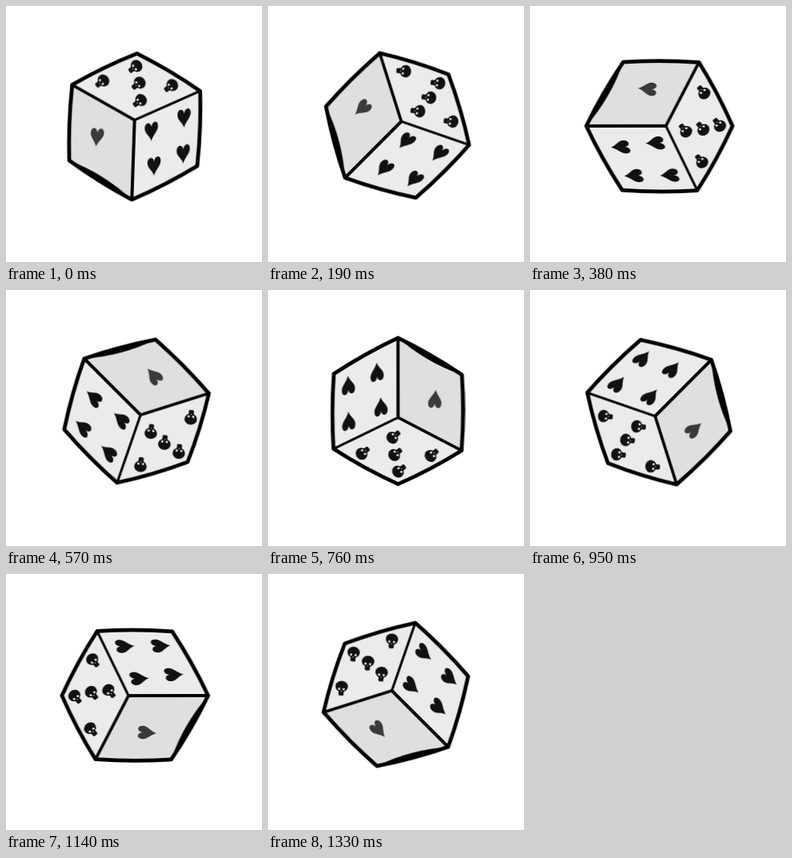
These frames come from a looping animation (320x320 px, 1520 ms). An HTML page:

```html
<!DOCTYPE html>
<html lang="en">
<head>
<meta charset="utf-8">
<title>Rolling die</title>
<style>
  html, body { margin: 0; width: 100%; height: 100%; overflow: hidden; background: #fff; }
  svg { display: block; width: 100%; height: 100%; }
  /* Rests with a slight tilt, then turns in hard eighths; the delay keeps samples off the step edges. */
  #die { transform-origin: 0 0; animation: roll 1520ms -1ms infinite; }
  @keyframes roll {
    0% { transform: rotate(2deg); animation-timing-function: step-end; }
    12.5% { transform: rotate(45deg); animation-timing-function: steps(7, end); }
    100% { transform: rotate(360deg); }
  }
  .line { fill: none; stroke: #000; stroke-linecap: round; stroke-linejoin: round; }
</style>
</head>
<body>
<svg viewBox="0 0 320 320">
  <defs>
    <path id="heart" d="M0 12C-2 5-8.3 1-8.3-5C-8.3-13-1-13 0-5.500C1-13 8.300-13 8.300-5C8.300 1 2 5 0 12Z"/>
    <use id="suit" href="#heart" transform="rotate(-2) skewY(-12)"/>
    <g id="skull" transform="rotate(51)">
      <ellipse cy="-2" rx="7.800" ry="7"/>
      <rect x="-3.200" y="1" width="6.400" height="8.500" rx="1.800"/>
      <g fill="#eee">
        <circle cx="-2.900" cy="1.200" r="1.400"/>
        <circle cx="2.900" cy="1.200" r="1.400"/>
        <circle cy="4" r=".6"/>
      </g>
    </g>
    <path id="outline" d="M-1-91.600Q40.900-72.400 79.600-47.600Q82.600-.7 79.200 46.200Q40.700 71.400-1 91.200Q-42.600 70.800-80.900 45Q-83.900-2.400-80.500-49.700Q-42.400-73.500-1-91.600Z"/>
  </defs>

  <g transform="translate(161.5 151)">
    <g id="die">
      <use href="#outline" fill="#ebebeb"/>
      <path fill="#dfdfdf" d="M-1.100-8.300L-80.500-49.700L-80.900 45L-1 91.200Z"/>

      <use href="#heart" x="0" y="0" fill="#3a3a3a" transform="translate(-47.3 14.5) rotate(4)"/>
      <g fill="#111">
        <use href="#suit" x="20.4" y="5"/>
        <use href="#suit" x="60.7" y="-13.1"/>
        <use href="#suit" x="25.3" y="48.2"/>
        <use href="#suit" x="61.2" y="31.7"/>

        <use href="#skull" x="-43.2" y="-55.2"/>
        <use href="#skull" x="-2.5" y="-74.8"/>
        <use href="#skull" x="2.3" y="-54.1"/>
        <use href="#skull" x="4.6" y="-32.4"/>
        <use href="#skull" x="43" y="-52.5"/>
      </g>

      <g class="line">
        <path stroke-width="3" d="M-1.100-8.300L79.600-47.600"/>
        <path stroke-width="4" d="M-1.100-8.300L-1 91.200"/>
        <path stroke-width="3.600" d="M-1.100-8.300L-80.500-49.700"/>
        <use href="#outline" stroke-width="4.800"/>
      </g>
      <!-- heavier edge under the single heart -->
      <path d="M-1 91.200Q-42.600 70.800-80.900 45Q-37 60-1 91.200Z"/>
    </g>
  </g>
</svg>
</body>
</html>
```
